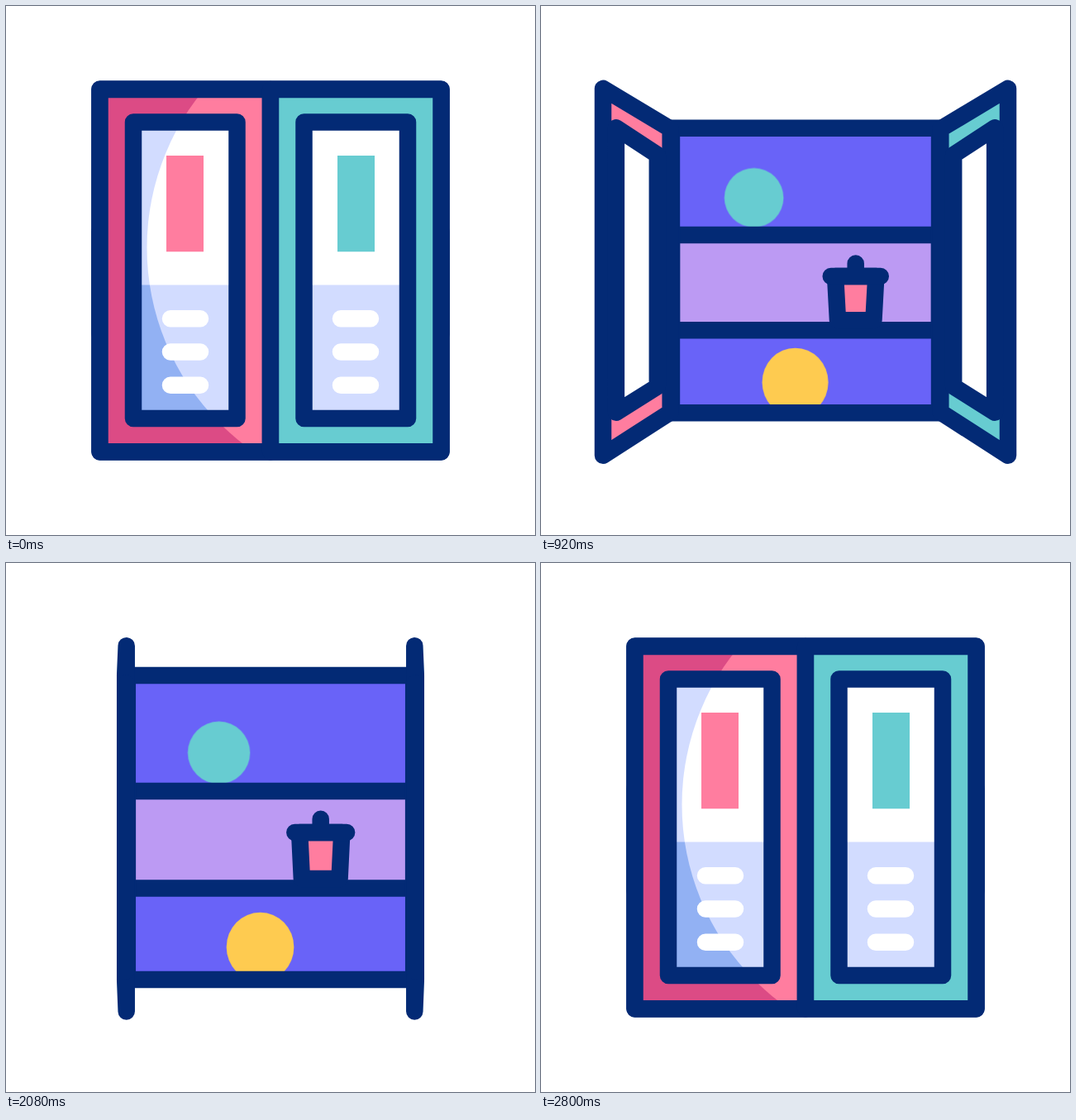
An HTML page without scripts for the animation above (3600 ms loop, 640x640 px).

```html
<!DOCTYPE html>
<html lang="en">
<head>
<meta charset="utf-8">
<title>Cupboard</title>
<style>
  html, body { margin: 0; width: 100%; height: 100%; overflow: hidden; background: #fff; }
  svg { display: block; width: 100vw; height: 100vh; }

  /* every part has a shut and an open pose; it eases between the two */
  path { animation: morph 3.6s cubic-bezier(.333, 0, .667, 1) infinite; }
  .ball { animation: shift 3.6s cubic-bezier(.333, 0, .667, 1) infinite; }
  .door path { animation-timing-function: cubic-bezier(.775, 0, .44, 1); }
  .front { animation: face 3.6s step-end infinite; }

  @keyframes morph {
    0%, 77.778%, 100% { d: var(--shut); }
    33.333% { d: var(--open); }
    44.444% { d: var(--open); animation-timing-function: cubic-bezier(.333, 0, .667, 1); }
  }
  @keyframes shift {
    0%, 77.778%, 100% { transform: var(--shut); }
    33.333%, 44.444% { transform: var(--open); }
  }
  /* the front is out of sight once the door has turned past its edge */
  @keyframes face {
    0%, 57.71%, 100% { visibility: visible; }
    21.11% { visibility: hidden; }
  }

  /* cupboard */
  .box {
    --shut: path("M113.5 100.5H526.5V539.5H113.5Z");
    --open: path("M165 155.2H475V484.8H165Z");
  }
  .middle {
    --shut: path("M113.5 272.8H526.5V397H113.5Z");
    --open: path("M165 277.7H475V391.5H165Z");
  }
  .bowl {
    --shut: path("M352.3 323L354.5 387H407L409.2 323Z");
    --open: path("M356.7 327.7L359.7 379.2H401.7L404.7 327.7Z");
  }
  .lid {
    --shut: path("M345.2 323H416.2M380.7 323V304");
    --open: path("M351.6 327.7H409.9M380.7 327.7V312.8");
  }
  .green {
    --shut: translate(257.6px, 222px) scale(1, 1);
    --open: translate(257.6px, 233.5px) scale(.8, .8);
  }
  .yellow {
    --shut: translate(307.5px, 492.5px) scale(1, 1);
    --open: translate(307.5px, 449.4px) scale(.912, .954);
  }

  /* left door; the right one is its mirror image */
  .outer {
    --shut: path("M113.5 101L320 101L320 539.2L113.5 539.2Z");
    --open: path("M161 153.5L50.5 99.7L50.5 544.3L161 486.5Z");
  }
  .inner {
    --shut: path("M154 140.6L279.5 140.6L279.5 499L154 499Z");
    --open: path("M139.5 184L72 148L72 491L139.5 456.5Z");
  }
  .low {
    --shut: path("M154 337.4L279.5 337.4L279.5 499L154 499Z");
    --open: path("M139.5 335L72 337L72 491L139.5 456.5Z");
  }
  .label {
    --shut: path("M194 181H239V297.2L194 297.2Z");
    --open: path("M118 195L95 186V302L118 304Z");
    --shut: path("M194 181L239 181V297.2L194 297.2Z");
  }
  .pills {
    --shut: path("M199 378.2L235 378.2M199 418.5L235 418.5M199 458.7L235 458.7");
    --open: path("M115.3 365L96 369M115.3 395.5L96 400.5M115.3 426.5L96 432.5");
  }

  .line, .pills { fill: none; stroke: #032a75; stroke-width: 20.5; stroke-linejoin: round; stroke-linecap: round; }
  .pills { stroke: #fff; }
  .box { fill: #6963f8; }
  .box.line { fill: none; }
  .middle { fill: #bc9af3; }
  .bowl { fill: #ff7d9f; }
  .green { fill: #67ccd1; }
  .yellow { fill: #fecb50; }
  .outer, .label { fill: var(--pane); }
  .inner { fill: var(--glass); }
  .low { fill: var(--base); }
  .outer.line, .inner.line { fill: none; }
  .door { --pane: #ff7d9f; --glass: #fff; --base: #d2dcff; }
  .teal { --pane: #67ccd1; }
  .shade { --pane: #dc4b85; --glass: #d2dcff; --base: #92b1f3; }
</style>
</head>
<body>
<svg viewBox="0 0 640 640">
  <!-- everything left of one fixed circle lies in shadow -->
  <mask id="dusk" maskUnits="userSpaceOnUse" x="0" y="0" width="640" height="640">
    <rect width="470" height="640" fill="#fff"/>
    <circle cx="470.5" cy="292.5" r="300" fill="#000"/>
  </mask>

  <path class="box"/>
  <circle class="ball green" r="43.3"/>
  <circle class="ball yellow" r="43.3"/>
  <path class="line middle"/>
  <path class="line bowl"/>
  <path class="line lid"/>
  <path class="line box"/>

  <g class="door">
    <path class="outer"/>
    <path class="inner"/>
    <g class="front">
      <path class="low"/>
      <path class="label"/>
      <g class="shade" mask="url(#dusk)">
        <path class="outer"/>
        <path class="inner"/>
        <path class="low"/>
        <path class="label"/>
      </g>
      <path class="pills"/>
    </g>
    <path class="line outer"/>
    <path class="line inner"/>
  </g>

  <g class="door teal" transform="translate(640) scale(-1 1)">
    <path class="outer"/>
    <path class="inner"/>
    <g class="front">
      <path class="low"/>
      <path class="label"/>
      <path class="pills"/>
    </g>
    <path class="line outer"/>
    <path class="line inner"/>
  </g>
</svg>
</body>
</html>
```
